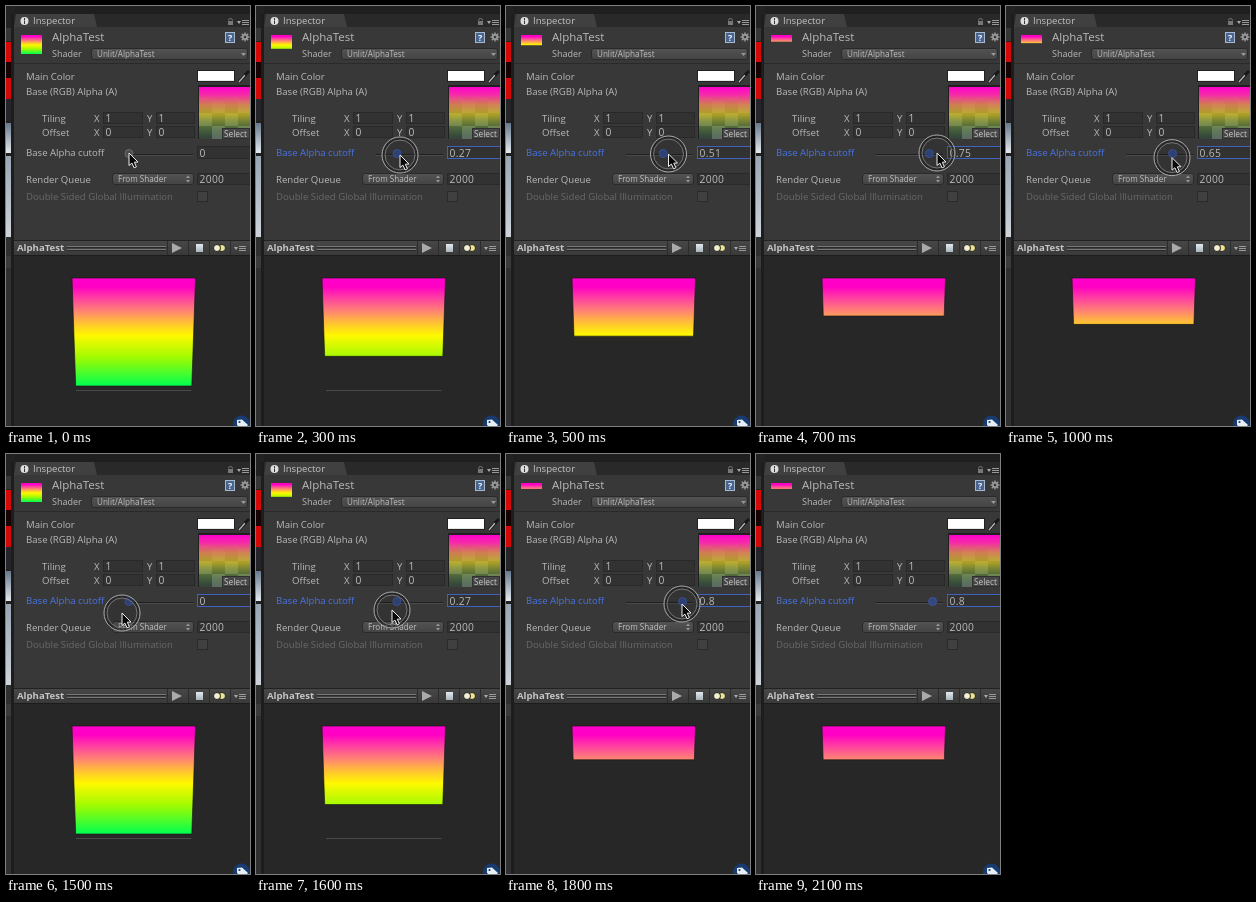
Recreate the animation shown at these times as an HTML page with a canvas. Size 244x420 px, loop 2.2 s.

```html
<!DOCTYPE html>
<html lang="en">
<head>
<meta charset="utf-8">
<title>Alpha cutoff inspector</title>
<style>
html, body { margin: 0; width: 100%; height: 100%; overflow: hidden; background: #383838; }
canvas { display: block; }
</style>
</head>
<body>
<canvas width="244" height="420"></canvas>
<script>
const g = document.querySelector('canvas').getContext('2d');
const LOOP = 2200, STEP = 100;
const TEXT = '#bababa', BLUE = '#4774e6';
const RAMP = [[0, '#ff00cc'], [.08, '#ff00c4'], [.2, '#ff489c'], [.31, '#ff8670'], [.42, '#ffc432'],
  [.53, '#fff800'], [.73, '#a4fa00'], [1, '#00ff50']];

// step, cutoff, pointer x, pointer y
const KEYS = [
  [0, 0, 123, 147], [1, .02, 126, 147], [3, .27, 144, 149], [7, .75, 181, 147], [9, .85, 182, 149],
  [12, .25, 134, 157], [14, 0, 116, 159], [15, 0, 116, 159], [18, .8, 176, 150], [22, .8, 176, 150]
];

function pose(n) {
  const i = KEYS.findIndex(k => k[0] > n), a = KEYS[i - 1], b = KEYS[i];
  const u = (n - a[0]) / (b[0] - a[0]);
  return a.map((v, j) => v + (b[j] - v) * u).slice(1);
}

function rect(x, y, w, h, fill, stroke) {
  g.fillStyle = fill;
  g.fillRect(x, y, w, h);
  if (stroke) {
    g.strokeStyle = stroke;
    g.lineWidth = 1;
    g.strokeRect(x + .5, y + .5, w - 1, h - 1);
  }
}

function text(s, x, y, size = 9.6, fill = TEXT, weight = 500) {
  g.font = `${weight} ${size}px "Open Sans", "Noto Sans", sans-serif`;
  g.fillStyle = fill;
  g.fillText(s, x, y);
}

function line(x1, y1, x2, y2, color, width = 1) {
  g.strokeStyle = color;
  g.lineWidth = width;
  g.beginPath();
  g.moveTo(x1, y1);
  g.lineTo(x2, y2);
  g.stroke();
}

function paint(fill, stroke, width = 1) {
  if (fill) { g.fillStyle = fill; g.fill(); }
  if (stroke) { g.strokeStyle = stroke; g.lineWidth = width; g.stroke(); }
}

function disc(x, y, r, ...style) {
  g.beginPath();
  g.arc(x, y, r, 0, 7);
  paint(...style);
}

function poly(points, ...style) {
  g.beginPath();
  points.forEach(p => g.lineTo(...p));
  g.closePath();
  paint(...style);
}

function fade(y1, y2, stops) {
  const f = g.createLinearGradient(0, y1, 0, y2);
  stops.forEach(s => f.addColorStop(...s));
  return f;
}

function field(x, y, w, value, focused, h = 12) {
  rect(x, y, w, h, '#323232', focused ? '#3f63bd' : '#292929');
  g.letterSpacing = '.3px';
  text(value, x + 2.5, y + h - 2.5, 10.3);
  g.letterSpacing = '0px';
}

function dropdown(x, y, w, h, label, lx) {
  g.beginPath();
  g.roundRect(x + .5, y + .5, w - 1, h - 1, 2.5);
  paint(fade(y, y + h, [[0, '#545454'], [1, '#434343']]), '#2a2a2a');
  text(label, lx, y + h - 3, 8.1, '#c0c0c0');
}

function menu(x, y) {
  poly([[x, y - 1], [x + 4, y - 1], [x + 2, y + 2]], '#aaa');
  for (const d of [-2, 0, 2]) line(x + 5, y + d + .5, x + 12, y + d + .5, '#999');
}

function background() {
  rect(0, 0, 244, 420, '#383838');
  rect(0, 0, 244, 8, '#1f1f1f');
  rect(0, 8, 244, 13, '#292929');
  // sliver of the neighbouring window
  rect(0, 0, 8, 420, '#222');
  rect(0, 22, 5, 13, '#363636');
  rect(0, 36, 5, 57, '#d40808');
  rect(0, 56, 5, 16, '#160405');
  rect(0, 93, 5, 22, '#24262a');
  rect(0, 117, 5, 30, fade(117, 147, [[0, '#66798c'], [1, '#e4e9ed']]));
  rect(0, 150, 5, 81, fade(150, 231, [[0, '#98a6b4'], [1, '#ced4d9']]));
  rect(0, 231, 5, 189, '#303030');
  rect(0, 250, 5, 12, '#3b3b3b');
  rect(5, 8, 3, 412, '#1d1d1d');
}

function header() {
  poly([[8, 21], [10, 8], [88, 8], [91, 21]], '#404040');
  disc(18.5, 15, 4, '#ddd');
  rect(18, 12, 1, 2, '#333');
  rect(18, 14.5, 1, 3.5, '#333');
  text('Inspector', 27, 18, 9.6, '#c4c4c4');
  rect(222, 15, 5, 4, '#777');
  g.beginPath();
  g.arc(224.5, 14.5, 2, Math.PI, 0);
  paint(null, '#777');
  menu(231, 16);

  text('AlphaTest', 46, 35, 11.5);
  text('Shader', 46, 51, 9);
  dropdown(85, 42, 157, 12, 'Unlit/AlphaTest', 91);
  poly([[235, 47], [240, 47], [237.5, 50]], '#999');
  rect(219, 26, 10, 11, '#48648f', '#a8b8cd');
  text('?', 222, 35, 9, '#f0f4fa', 700);
  for (let i = 0; i < 4; i++) {
    const c = 4.5 * Math.cos(i * Math.PI / 4), s = 4.5 * Math.sin(i * Math.PI / 4);
    line(239 - c, 31 - s, 239 + c, 31 + s, '#999', 1.5);
  }
  disc(239, 31, 3, '#999');
  disc(239, 31, 1.3, '#383838');
  line(8, 57.5, 244, 57.5, '#2a2a2a');
}

function texture() {
  rect(192, 79, 52, 54, '#202020');
  for (let y = 0; y < 4; y++)
    for (let x = 0; x < 4; x++)
      rect(193 + x * 13, 81 + y * 13, 13, 13, (x + y) % 2 ? '#383838' : '#646464');
  rect(193, 81, 51, 52, fade(81, 133, [
    [0, '#ff00cc'], [.15, '#f62ca8'], [.33, '#e08058e8'], [.53, '#d8c820b8'], [.74, '#88b83870'], [1, '#20a05018']]));
  rect(216, 122, 28, 11, '#484848', '#303030');
  text('Select', 218, 130.5, 8.3, '#c8c8c8');
}

function properties(c, focused) {
  text('Main Color', 20, 74);
  rect(191, 64, 38, 12, '#fff', '#222');
  rect(192, 74, 36, 1, '#e8e8e8');
  line(233, 76, 240, 68, '#1c1c1c', 3);
  line(233, 76, 239, 69, '#bbb', 1.2);
  line(239, 69, 243, 65, '#161616', 3);
  text('Base (RGB) Alpha (A)', 20, 88.5);
  texture();
  [['Tiling', 106, '1'], ['Offset', 120, '0']].forEach(([name, y, v]) => {
    text(name, 36, y + 9.5);
    text('X', 88, y + 9.5);
    field(97, y, 40, v);
    text('Y', 141, y + 9.5);
    field(150, y, 39, v);
  });

  text('Base Alpha cutoff', 20, 150, 9.6, focused ? BLUE : TEXT);
  line(120, 148.5, 187, 148.5, '#202020');
  line(120, 149.5, 187, 149.5, '#4b4b4b');
  disc(123 + 67 * c, 147.5, 4, focused ? '#34487f' : '#4c4c4c', focused ? '#3c56a0' : '#6c6c6c');
  field(191, 140, 54, String(+c.toFixed(2)), focused, 13);

  text('Render Queue', 20, 176.5);
  dropdown(106, 167, 82, 12, 'From Shader', 112);
  poly([[180, 172], [182, 169.5], [184, 172]], '#999');
  poly([[180, 174], [182, 176.5], [184, 174]], '#999');
  field(191, 167, 54, '2000');
  text('Double Sided Global Illumination', 20, 193.5, 9.6, '#696969');
  rect(191, 185, 11, 11, '#404040', '#2a2a2a');
}

function previewBar() {
  rect(8, 234, 236, 16, fade(234, 250, [[0, '#484848'], [1, '#383838']]));
  line(8, 234.5, 244, 234.5, '#222');
  line(8, 249.5, 244, 249.5, '#1c1c1c');
  text('AlphaTest', 11, 245, 9.6, '#c6c6c6', 700);
  for (const y of [240.5, 243.5]) {
    line(61, y, 160, y, '#787878');
    line(61, y + 1, 160, y + 1, '#292929');
  }
  for (const x of [161.5, 182.5, 203.5, 224.5]) line(x, 235, x, 249, '#2c2c2c');
  poly([[166, 237], [176, 242], [166, 247]], '#aaa');
  rect(190, 238, 7, 8, fade(238, 246, [[0, '#e2eaee'], [1, '#a9b6bd']]));
  disc(216, 242, 3.5, '#eee48c', '#222');
  disc(211, 242, 3.5, '#f4f0d4', '#222');
  menu(228, 242);
}

function preview(c, kept) {
  rect(8, 250, 236, 170, '#272727');
  const h = 108 * kept, inset = 3.7 * kept;
  poly([[66, 272], [189.5, 272], [189.5 - inset, 272 + h], [66 + inset, 272 + h]],
    fade(272, 380, RAMP), '#11111199');
  if (c < .5) line(70, 384.5, 185.5, 384.5, '#4a4a4a');
  disc(235.5, 418, 8.5, '#173a70');
  poly([[231, 414], [236, 413.5], [242, 419], [237, 424], [231, 419]], '#e6eef6');
  disc(233.5, 416, 1.1, '#173a70');
}

function pointer(x, y, pressed) {
  if (pressed) {
    disc(x, y, 16.5, '#00000018', '#1c1c1c88', 3);
    disc(x, y, 18, null, '#acacac');
    disc(x, y, 15, null, '#8a8a8a', .8);
  }
  const arrow = [[0, 0], [0, 12.5], [2.9, 10.1], [5.1, 14.8], [7.4, 13.8], [5.3, 9.2], [9, 9]];
  poly(arrow.map(([dx, dy]) => [x + dx, y + dy]), '#080808', '#eee');
}

function draw(now) {
  const n = Math.floor(now % LOOP / STEP);
  const [c, x, y] = pose(n), focused = n > 0;
  const kept = c ? .935 - .778 * c : 1;
  background();
  header();
  rect(15, 29, 21, 19 * kept, fade(29, 48, RAMP));
  properties(c, focused);
  previewBar();
  preview(c, kept);
  if (n < 21) pointer(x, y, focused && n < 20);
  requestAnimationFrame(draw);
}
requestAnimationFrame(draw);
</script>
</body>
</html>
```
